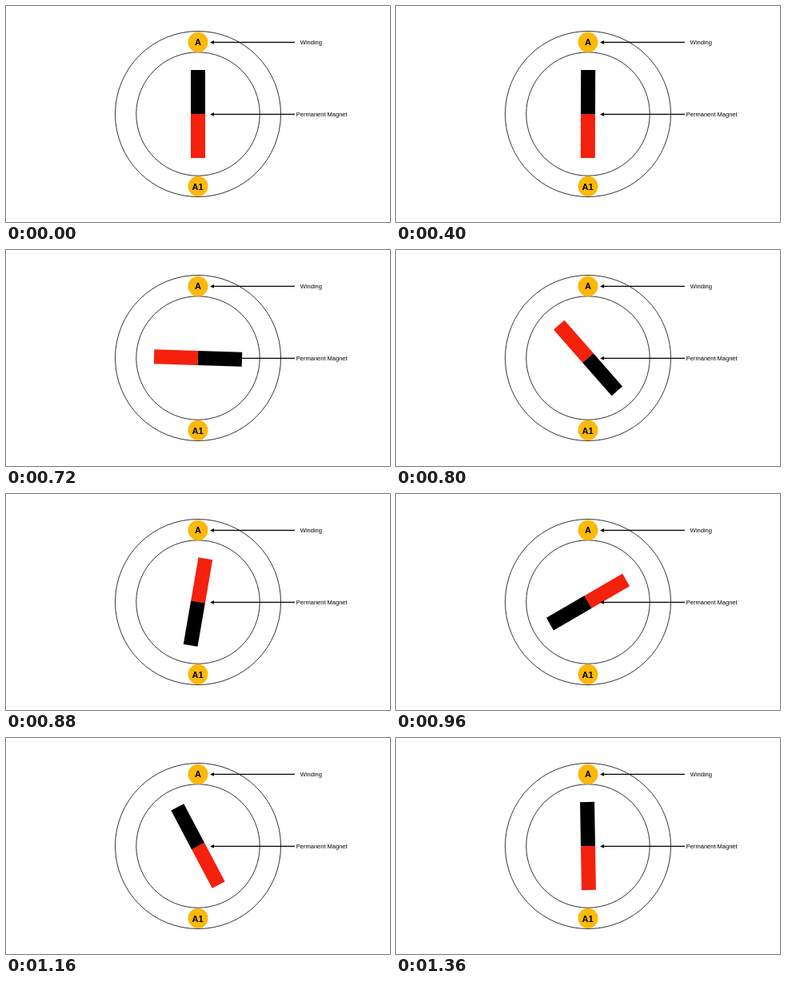
Write an HTML page that moves like this. It is 480 px wide and 270 px high and loops after 1.76 s.

```html
<!DOCTYPE html>
<html lang="en">
<head>
<meta charset="utf-8">
<title>Rotor and winding</title>
<style>
  html, body { margin: 0; width: 100%; height: 100%; overflow: hidden; background: #fff; }
  svg { display: block; width: 480px; height: 270px; }
  text { font-family: "Liberation Sans", Arial, sans-serif; fill: #000; }
  .ring { fill: none; stroke: #333; stroke-width: 1; }
  .badge circle { fill: #fbb908; }
  .badge text { font-size: 11px; font-weight: 700; text-anchor: middle; }
  .label { font-size: 7.5px; }
</style>
</head>
<body>
<svg viewBox="0 0 480 270">
  <defs>
    <g id="arrow">
      <path d="M259 0H361" stroke="#000" stroke-width="1.3"/>
      <path d="M255 0L260 -2.4V2.4Z"/>
    </g>
  </defs>
  <circle class="ring" cx="240" cy="135" r="103.5"/>
  <circle class="ring" cx="240" cy="135" r="77.2"/>
  <g class="badge">
    <circle cx="240" cy="45.3" r="12.5"/>
    <text x="240" y="49.3">A</text>
    <circle cx="240" cy="225.3" r="12.5"/>
    <text x="239.5" y="229.5">A1</text>
  </g>
  <g id="magnet">
    <rect x="231" y="80" width="18" height="55.2"/>
    <rect x="231" y="135" width="18" height="55" fill="#f3210d"/>
  </g>
  <use href="#arrow" y="45.4"/>
  <use href="#arrow" y="135.4"/>
  <text class="label" x="367.8" y="48">Winding</text>
  <text class="label" x="362.8" y="138">Permanent Magnet</text>
</svg>
<script>
  const LOOP = 1760, TICK = 40;
  const HOLD = 400, START = 384, SPIN = 960, TURN = 359;
  const magnet = document.getElementById("magnet");

  // Ease in and out: cubic Bezier (.42, 0) (.58, 1), solved by bisection.
  function ease(u) {
    if (u <= 0) return 0;
    if (u >= 1) return 1;
    let lo = 0, hi = 1;
    for (let i = 0; i < 30; i++) {
      const s = (lo + hi) / 2, r = 1 - s;
      const x = 1.26 * s * r * r + 1.74 * s * s * r + s * s * s;
      if (x < u) lo = s; else hi = s;
    }
    return lo * lo * (3 - 2 * lo);
  }

  function angleAt(time) {
    const t = Math.floor((time % LOOP) / TICK) * TICK;
    return t < HOLD ? 0 : TURN * ease((t - START) / SPIN);
  }

  const begin = performance.now();
  function draw() {
    const angle = angleAt(performance.now() - begin);
    magnet.setAttribute("transform", `rotate(${angle.toFixed(3)} 240 135)`);
    requestAnimationFrame(draw);
  }
  draw();
</script>
</body>
</html>
```
